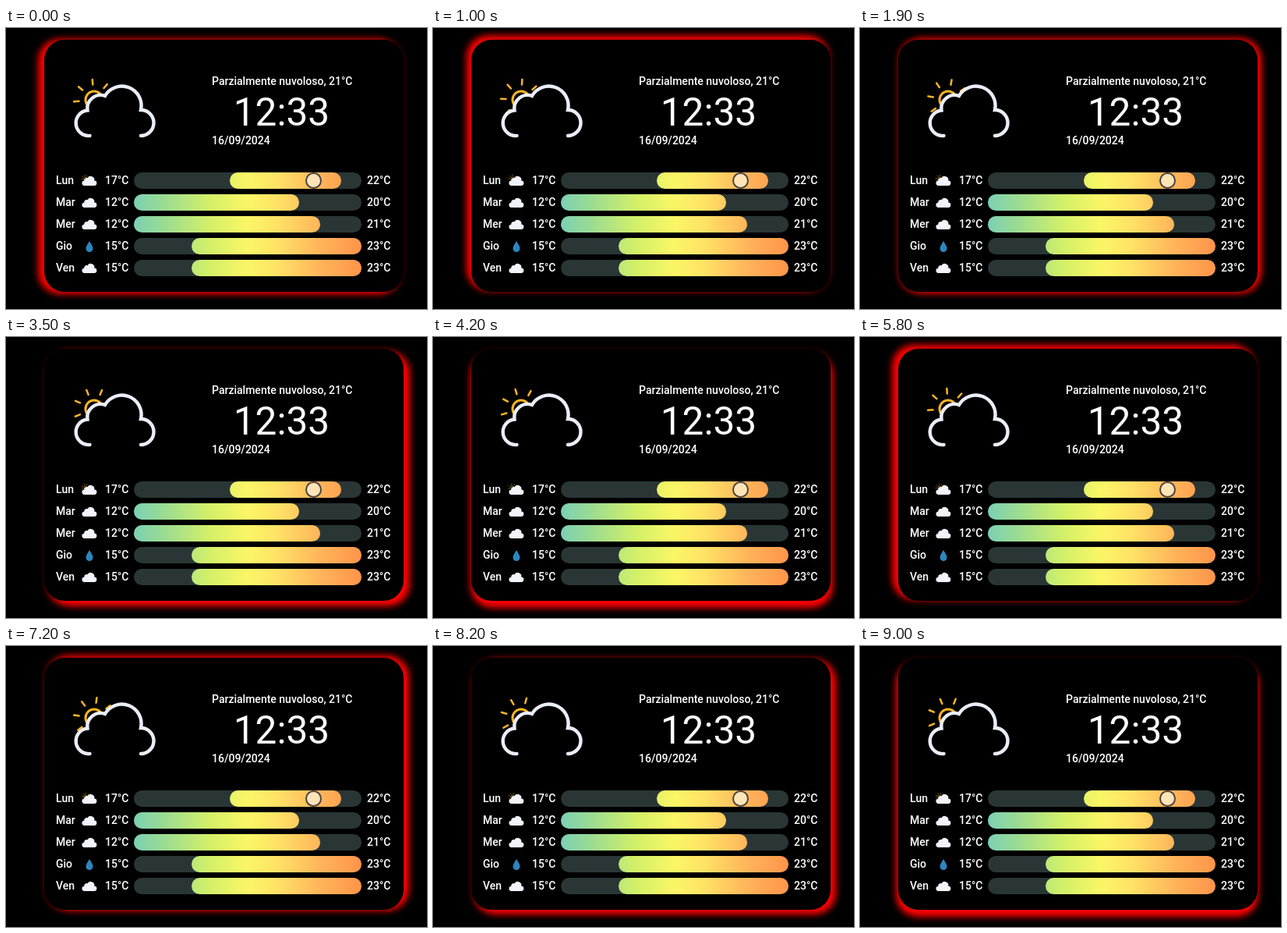
Recreate the animation shown at these times as an HTML page. Size 540x360 px, loop 9100 ms.

```html
<!DOCTYPE html>
<html lang="it">
<head>
<meta charset="utf-8">
<title>Meteo</title>
<style>
  html, body { margin: 0; width: 100%; height: 100%; overflow: hidden; background: #000; }
  #card { position: absolute; left: 49px; top: 15px; width: 461px; height: 323px; border-radius: 26px; background: #000; }
  svg { position: absolute; left: 0; top: 0; }
  text { font: 500 14px Roboto, sans-serif; fill: #fff; }
  .clock { font-size: 49.5px; font-weight: 400; }
  .ray { stroke: #fbb524; stroke-width: 2.5; stroke-linecap: round; }
</style>
</head>
<body>
<div id="card"></div>
<svg width="540" height="360" viewBox="0 0 540 360">
  <defs>
    <linearGradient id="heat" gradientUnits="userSpaceOnUse" x1="164" x2="456">
      <stop offset="0" stop-color="#7bd0b4"/>
      <stop offset=".13" stop-color="#9adb92"/>
      <stop offset=".33" stop-color="#d2f068"/>
      <stop offset=".5" stop-color="#fbf666"/>
      <stop offset=".63" stop-color="#fee266"/>
      <stop offset=".82" stop-color="#ffb45a"/>
      <stop offset="1" stop-color="#ff944a"/>
    </linearGradient>
    <path id="cloud" d="M107.5 138A16.3 16.3 0 0 1 104.5 105.5A17 17 0 0 1 127 87A25 25 0 0 1 173 105A16.4 16.4 0 0 1 173 138"/>
    <g id="sun">
      <circle cx="113" cy="92" r="11" fill="none" stroke="#fbb524" stroke-width="3"/>
      <g class="rays"></g>
    </g>
  </defs>
  <use href="#sun"/>
  <use href="#cloud" fill="#000" stroke="#eaeefa" stroke-width="4.4" stroke-linecap="round"/>
  <text x="264" y="73">Parzialmente nuvoloso, 21°C</text>
  <text x="291.8" y="125" class="clock">12:33</text>
  <text x="264" y="149">16/09/2024</text>
  <g id="rows"></g>
  <circle cx="394.5" cy="195.5" r="9.5" fill="#ffe4b8" stroke="#4b4440" stroke-width="2"/>
</svg>
<script>
const LOOP = 9100, STEP = 100;
const card = document.getElementById('card');
const rays = document.querySelector('.rays');

rays.innerHTML = [...Array(8).keys()].map(i =>
  `<path class="ray" d="M113 72.5v-6.5" transform="rotate(${i * 45} 113 92)"/>`).join('');

// day, low, high, bar start, bar end, icon
const days = [
  ['Lun', 17, 22, 287, 430, 'sun'],
  ['Mar', 12, 20, 164, 376, 'cloud'],
  ['Mer', 12, 21, 164, 403, 'cloud'],
  ['Gio', 15, 23, 238, 456, 'drop'],
  ['Ven', 15, 23, 238, 456, 'cloud']
];

function icon(kind, y) {
  if (kind === 'drop')
    return `<path d="M107 ${y - 6.5}C109 ${y - 3} 111.5 ${y} 111.5 ${y + 3}a4.5 4.5 0 0 1-9 0C102.5 ${y} 105 ${y - 3} 107 ${y - 6.5}z" fill="#2c86c0"/>`;
  return `<g transform="translate(107 ${y + .5}) scale(.19) translate(-140 -107)">
    ${kind === 'sun' ? '<use href="#sun"/>' : ''}
    <use href="#cloud" fill="#f1f4fb"/></g>`;
}

const bar = (x, end, y, fill) =>
  `<rect x="${x}" y="${y - 10.5}" width="${end - x}" height="21" rx="10.5" fill="${fill}"/>`;

document.getElementById('rows').innerHTML = days.map(([day, low, high, from, to, kind], i) => {
  const y = 195.5 + i * 28, base = y + 4.5;
  return `<text x="64" y="${base}">${day}</text>${icon(kind, y)}
    <text x="127" y="${base}">${low}°C</text>
    ${bar(164, 456, y, '#2a3636')}${bar(from, to, y, 'url(#heat)')}
    <text x="463" y="${base}">${high}°C</text>`;
}).join('');

// glow offset: time, x, y
const glow = [
  [0, -6, 1], [900, -5, -4], [1900, 3, 0], [3000, 5, 2], [3500, 6, 5],
  [4200, 1, 7], [5000, -5, 4], [5500, -7, 0], [5800, -6, -3], [6500, -1, -5],
  [7200, 5, -1], [7800, 7, 2], [8400, 4, 5], [9000, -1, 7], [9100, -2, 7]
];

function draw(now) {
  const t = Math.floor(now % LOOP / STEP) * STEP;
  const i = glow.findIndex(k => k[0] > t);
  const a = glow[i - 1], b = glow[i], f = (t - a[0]) / (b[0] - a[0]);
  const mix = n => a[n] + (b[n] - a[n]) * f;
  card.style.boxShadow = `${mix(1)}px ${mix(2)}px 9px 2px red`;
  rays.setAttribute('transform', `rotate(${t * .008 - 5} 113 92)`);
}

const start = performance.now();
function tick() {
  draw(performance.now() - start);
  requestAnimationFrame(tick);
}
tick();
</script>
</body>
</html>
```
